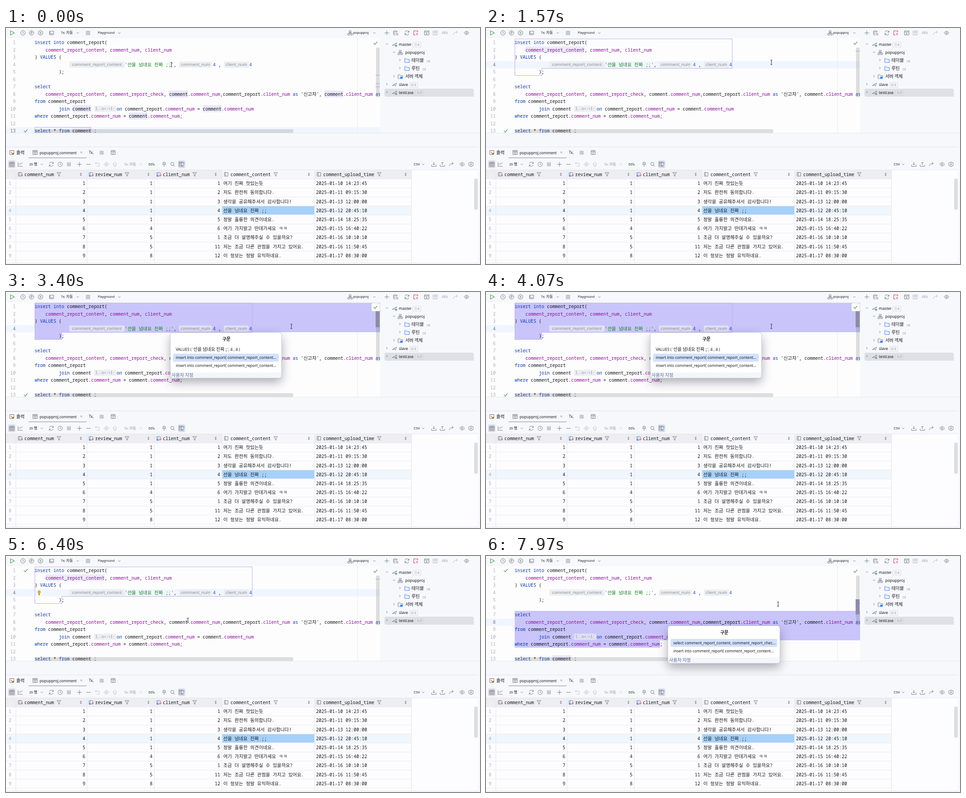
Recreate the animation shown at these times as an HTML page with a canvas. Size 1058x529 px, loop 8000 ms.

```html
<!DOCTYPE html>
<html lang="ko">
<head>
<meta charset="utf-8">
<title>SQL editor</title>
<style>
html, body { margin: 0; width: 1058px; height: 529px; overflow: hidden; background: #f7f8fb; }
canvas { display: block; width: 1058px; height: 529px; }
</style>
</head>
<body>
<canvas></canvas>
<script>
const canvas = document.querySelector('canvas'), g = canvas.getContext('2d');
const ratio = window.devicePixelRatio || 1;
canvas.width = 1058 * ratio;
canvas.height = 529 * ratio;

const LOOP = 8000;
const INK = '#6c707e', PALE = '#b9bcc8', DARK = '#17181c', GREEN = '#4fa85a', BLUE = '#4682fa';
const PANEL = '#f7f8fb', RULE = '#e6e7ee', VIOLET = '#b9aeee';

const ring = r => `M${-r} 0a${r} ${r} 0 1 0 ${2 * r} 0a${r} ${r} 0 1 0 ${-2 * r} 0`;
const shapes = {
  play: 'M-4-4.7 4.7 0-4 4.7Z',
  clock: ring(5) + 'M0-3V0L2.5 1.5',
  circleP: ring(5) + 'M-1.3 3V-2.5H.4a1.6 1.6 0 0 1 0 3.2H-1.3',
  gear: 'M-1.5-5h3l.6 1.6 1.8-.3 1.4 2.4-1.2 1.3 1.2 1.3-1.4 2.4-1.8-.3-.6 1.6h-3l-.6-1.6-1.8.3-1.4-2.4 1.2-1.3-1.2-1.3 1.4-2.4 1.8.3Z' + ring(1.5),
  screen: 'M-3.5-4h8v6h-8ZM-5-4v8h9.5',
  down: 'M-2.5-1.2 0 1.3 2.5-1.2',
  right: 'M-1.2-2.5 1.3 0-1.2 2.5',
  schema: 'M-2-5h4v3.6h-4ZM-5 1.2h3.8v3.6h-3.8ZM1.2 1.2h3.8v3.6h-3.8ZM0-1.4V0M-3 1.2V0h6v1.2',
  plus: 'M0-5V5M-5 0H5',
  minus: 'M-5 0H5',
  db: 'M-5-3.5a4 1.5 0 1 0 8 0a4 1.5 0 1 0-8 0V3.5a4 1.5 0 0 0 4 1.5M-5 0a4 1.5 0 0 0 4 1.5M3-3.5V-1M1 3a2 2 0 1 0 4 0a2 2 0 1 0-4 0',
  refresh: 'M4.5-1.5a4.7 4.7 0 0 0-9 0M-4.5 1.5a4.7 4.7 0 0 0 9 0M4.5-5v3.5h-3M-4.5 5v-3.5h3',
  table: 'M-5-4.5h10v9h-10ZM-5-1.5h10M-1.7-4.5v9M1.7-4.5v9',
  chart: 'M-5-4.5v9h10M-3 1l2.5-3 2 2 3.5-4',
  undo: 'M-2-5l-2.5 2.5 2.5 2.5M-4.5-2.5h6a3 3 0 0 1 0 6.5h-3',
  eye: 'M-5.5 0q5.5-8 11 0q-5.5 8-11 0' + ring(1.7),
  up: 'M0-5l4.5 4.5h-2.5v5h-4v-5h-2.5Z',
  pin: 'M-3-4.5h6M-2-4.5v4.5h4v-4.5M-4 0h8M0 0v5',
  search: 'M-4.5-1a3.5 3.5 0 1 0 7 0a3.5 3.5 0 1 0-7 0M1.5 1.5 5 5',
  filter: 'M-4.2-4h8.4l-3 4v4.2l-2.2-1.4v-2.8Z',
  save: 'M0-5v6.5M-2.5-1 0 1.5 2.5-1M-5 1v3.7h10v-3.7',
  load: 'M0 2v-7M-2.5-2.5 0-5 2.5-2.5M-5 1v3.7h10v-3.7',
  jump: 'M-5 4q1-6 9.5-6M1.5-5 4.5-2 1.5 1',
  runBox: 'M-5-4.5h10v9h-10ZM-5-2h10M-1 0v3l2.5-1.5Z',
  link: 'M5-1v-3.5h-9v9h4M2 1.5 5 4.5M5 1.5 2 4.5',
  layout: 'M-4.5-4.5h9v9h-9ZM-4.5-1.5h9M0-4.5v9',
  page: 'M-4.5-4.5h9v9h-9ZM-2-2 0 0-2 2',
  column: 'M-4.5-4h8v8h-8ZM-2-4v8',
  folder: 'M-5-4h4l1.2 1.5h5v6.7h-10.2Z',
  feather: 'M-5 2.5 5-4 2 3.5 0 .5Z',
  check: 'M-4 0l3 3 5-6',
  cross: 'M-2.3-2.3 2.3 2.3M2.3-2.3-2.3 2.3',
  sort: 'M-1.8-1 0-3.2 1.8-1ZM-1.8 1 0 3.2 1.8 1Z',
  beam: 'M-2-5h1.2q.8 0 .8.8v8.4q0 .8-.8.8H-2M2-5H.8q-.8 0-.8.8M2 5H.8q-.8 0-.8-.8'
};
for (const k in shapes) shapes[k] = new Path2D(shapes[k]);

function icon(name, x, y, color = INK, width = .9, fill) {
  g.save();
  g.translate(x, y);
  g.strokeStyle = color;
  g.lineWidth = width;
  if (fill) { g.fillStyle = fill; g.fill(shapes[name]); }
  g.stroke(shapes[name]);
  g.restore();
}

function rect(x, y, w, h, color, radius = 0) {
  g.fillStyle = color;
  g.beginPath();
  g.roundRect(x, y, w, h, radius);
  g.fill();
}

function outline(points, color) {
  g.strokeStyle = color;
  g.lineWidth = 1;
  g.beginPath();
  points.forEach(([x, y]) => g.lineTo(x + .5, y + .5));
  g.closePath();
  g.stroke();
}

// Draws Latin and Hangul runs with their own fonts; returns the end position.
function text(s, x, y, color = DARK, size = 8.55, { mono, align = 0, weight = 400 } = {}) {
  const runs = String(s).match(/[ㄱ-ㅎ가-힣]+|[^ㄱ-ㅎ가-힣]+/g).map(str => {
    const hangul = /[ㄱ-ㅎ가-힣]/.test(str);
    const px = hangul ? size * (mono ? 1.045 : 1.18) : size;
    const family = hangul ? '"Noto Sans CJK KR", sans-serif'
      : mono ? '"Noto Sans Mono", monospace' : '"Noto Sans", sans-serif';
    const font = `${weight} ${px}px ${family}`;
    g.font = font;
    return { str, font, w: g.measureText(str).width };
  });
  x -= align * runs.reduce((sum, r) => sum + r.w, 0);
  g.fillStyle = color;
  for (const r of runs) {
    g.font = r.font;
    g.fillText(r.str, x, y + size * .35);
    x += r.w;
  }
  return x;
}
const mono = (s, x, y, color, align = 0) => text(s, x, y, color, 10, { mono: true, align, weight: 500 });

const lineY = n => 16 + 16.5 * n;

function code(s, x, n) {
  for (const token of s.match(/'[^']*;;'|\w+|[^\w']+|'/g)) {
    const color = /;;'/.test(token) ? '#067d17'
      : /^(insert|into|VALUES|select|from|join|on|where|as)$/.test(token) ? '#0a36a8'
      : /_(num|content|check)$/.test(token) ? '#871094'
      : /^\d+$/.test(token) ? '#1750eb' : DARK;
    x = mono(token, x, lineY(n), color);
  }
}

function hint(s, x, w, n, size = 9.3, isMono) {
  rect(x, lineY(n) - 7, w, 14, 'rgba(233,234,238,.72)', 3);
  text(s, x + w / 2, lineY(n), '#878b98', size, { mono: isMono, align: .5 });
}

function topBar() {
  icon('play', 14, 11, GREEN, 1.2);
  [['clock', 38], ['circleP', 57], ['gear', 77], ['screen', 102]].forEach(([n, x]) => icon(n, x, 11));
  text('Tx: 자동', 123, 11, DARK, 7);
  icon('down', 160, 11);
  rect(178, 6, 10, 10, '#c9cbd3', 1);
  text('Playground', 205, 11, DARK, 6.9);
  icon('down', 253, 11);
  icon('schema', 768, 11);
  text('popupproj', 775, 11, DARK, 7);
  icon('down', 822, 11);
  [['plus', 850], ['db', 870], ['refresh', 895], ['runBox', 939], ['eye', 1028]].forEach(([n, x]) => icon(n, x, 11));
  icon('link', 914, 11, '#db3b4b', 1.1);
  icon('table', 958, 11, PALE);
  text('DDL', 973, 11, '#8d91a0', 7);
  icon('jump', 1003, 11, PALE);
}

function tree() {
  rect(845, 136, 199, 18, '#dfe0e5', 3);
  const source = (y, name, count, bx, live, open) => {
    icon(open ? 'down' : 'right', 850, y - 1);
    icon('feather', 867, y);
    if (live) rect(869, y + 1, 4, 4, '#55b062', 2);
    text(name, 877, y);
    g.strokeStyle = '#d3d5db';
    g.lineWidth = .8;
    g.strokeRect(bx - 3, y - 5, 18, 11);
    text(count, bx, y, '#8d91a0', 7.6);
  };
  source(37, 'master', '1/4', 911, true, true);
  icon('down', 866, 54);
  icon('schema', 880, 55);
  text('popupproj', 891, 55, DARK, 8.8);
  [[73, '테이블', 18, 938], [91, '루틴', 10, 929]].forEach(([y, name, n, x]) => {
    icon('right', 879, y - 1);
    icon('folder', 895, y, BLUE, 1, '#edf3ff');
    text(name, 905, y);
    text(n, x, y + 1, '#8d91a0', 7.4);
  });
  icon('right', 866, 108);
  icon('folder', 880, 109);
  rect(880, 109, 5, 5, BLUE, 1);
  text('서버 객체', 891, 109);
  source(127, 'slave', '0/3', 904);
  source(145, 'testcase', '1/7', 917, true);
}

function results() {
  rect(0, 266, 1054, 1, RULE);
  icon('page', 13, 279, '#8a5a50');
  rect(13, 280, 4, 4, '#e0653f', 1);
  text('출력', 23, 280);
  icon('table', 65, 279);
  text('popupproj.comment', 75, 280);
  icon('cross', 168, 279, '#9a9eab');
  rect(50, 290, 130, 2, '#b9bbd0', 1);
  text('Tx,', 185, 279, DARK, 8);
  rect(209, 275, 9, 9, '#c9cbd3', 1);
  icon('layout', 239, 279);

  [13, 392].forEach(x => rect(x - 8, 297, 16, 17, '#dadce3', 3));
  [['table', 13], ['chart', 32], ['refresh', 101], ['clock', 121], ['plus', 164], ['minus', 184],
    ['pin', 353], ['search', 372], ['save', 955], ['load', 974], ['jump', 994], ['eye', 1018], ['gear', 1038]
  ].forEach(([n, x]) => icon(n, x, 305.5));
  [['undo', 204], ['eye', 224], ['up', 243], ['down', 301]].forEach(([n, x]) => icon(n, x, 305.5, PALE));
  icon('layout', 391, 305);
  icon('filter', 394, 307, BLUE, .9, '#fff');
  text('20 행', 52, 305.5, DARK, 7.2);
  icon('down', 80, 305.5);
  rect(136, 301, 9, 9, '#c9cbd3', 1);
  text('Tx: 자동', 264, 305.5, '#8d91a0', 7);
  text('DDL', 318, 305.5, DARK, 7.5);
  text('CSV', 910, 305.5, DARK, 7.8);
  icon('down', 931, 305.5);

  rect(0, 318, 1054, 209, '#fdfdff');
  rect(0, 318, 905, 20, '#eeeef2');
  rect(482, 318, 207, 20, '#f6f6fb');
  rect(0, 399, 905, 20, '#f0f6fe');
  rect(483, 399, 205, 19, '#a6d0fa');
  rect(0, 317.5, 1054, 1, RULE);
  for (let i = 0; i < 10; i++) rect(0, 338 + 20.2 * i, 905, 1, '#ebebf1');
  [22, 181, 331, 482, 689, 905].forEach(x => rect(x - .5, 318, 1, 209, '#e3e3ea'));
  [['comment_num', 41, 118, 167, 1], ['review_num', 199, 270, 318, 2], ['client_num', 350, 421, 468, 2],
    ['comment_content', 501, 602, 676, 0], ['comment_upload_time', 708, 833, 892, 0]
  ].forEach(([name, x, fx, sx, keys]) => {
    icon('column', x - 9, 328, keys === 2 ? '#5f83d8' : INK);
    if (keys) rect(x - 8, 328, 5, 4, '#e8924a', 2);
    if (keys === 2) rect(x - 14, 330, 4, 3, BLUE, 1);
    mono(name, x, 328);
    icon('filter', fx, 328);
    icon('sort', sx, 328, INK, .3, INK);
  });
  [[1, 1, '여기 진짜 맛있는듯', '10 14:23:45'], [1, 2, '저도 완전히 동의합니다.', '11 09:15:30'],
    [1, 3, '생각을 공유해주셔서 감사합니다!', '13 12:00:00'], [1, 4, '선을 넘네요 진짜 ;;', '12 20:45:10'],
    [1, 5, '정말 훌륭한 의견이네요.', '14 18:25:35'], [4, 6, '여기 가지말고 딴데가세요 ㅋㅋ', '15 16:40:22'],
    [5, 1, '조금 더 설명해주실 수 있을까요?', '16 10:10:10'], [5, 11, '저는 조금 다른 관점을 가지고 있어요.', '16 11:50:45'],
    [8, 12, '이 정보는 정말 유익하네요.', '17 08:30:00']
  ].forEach(([review, client, content, time], i) => {
    const y = 348.7 + 20.2 * i;
    mono(i + 1, 6, y, '#a8adbd');
    mono(i + 1, 177, y, DARK, 1);
    mono(review, 327, y, DARK, 1);
    mono(client, 478, y, DARK, 1);
    mono(content, 485, y);
    mono('2025-01-' + time, 692, y);
  });
  rect(1045, 338, 8, 69, '#dcdde2');
  rect(0, 526, 1054, 1, RULE);
}

const insertBox = [[64, 24], [549, 24], [549, 90], [124, 90], [124, 106], [64, 106]];
const selectBox = [[64, 123], [840, 123], [840, 189], [388, 189], [388, 205], [64, 205]];
const lastBox = [[64, 222], [189, 222], [189, 240], [64, 240]];
const commentUses = [[364, 8], [711, 8], [148, 10], [439, 10], [274, 11], [148, 13]];

function editor(t) {
  const line = t < 650 ? 13 : t < 6800 ? 4 : 8;
  const onComment = line !== 4;
  const pickInsert = t >= 3100 && t < 4600, pickSelect = t >= 7600;
  const popupOpen = pickInsert || pickSelect;

  g.save();
  g.beginPath();
  g.rect(0, 23, 835, 212);
  g.clip();
  rect(0, 23, 835, 212, '#fdfdfe');
  rect(0, lineY(line) - 8, 835, 16.5, '#f1f6fe');
  rect(784, 23, 1, 212, '#ebecf1');
  if (onComment) commentUses.forEach(([x, n]) => rect(x, lineY(n) - 8, 42, 15.5, '#e9e7f9'));
  else rect(88, lineY(2) - 8, 132, 15.5, '#ecebf9');

  const selected = '#c9c5fb';
  if (pickInsert) {
    rect(64, 24, 771, 66, selected);
    rect(64, 90, 60, 16, selected);
  }
  if (pickSelect) {
    rect(64, 123, 771, 66, selected);
    rect(64, 189, 324, 16.5, selected);
  }
  if (!pickSelect) outline(t < 1000 ? lastBox : t < 7250 ? insertBox : selectBox, VIOLET);

  for (let n = 1; n <= 13; n++) mono(n, 21.5, lineY(n), n === line ? '#6c707e' : '#a8adbd', 1);
  code('insert into comment_report(', 64, 1);
  code('comment_report_content, comment_num, client_num', 88, 2);
  code(') VALUES (', 64, 3);
  hint('comment_report_content', 141, 124, 4);
  code("'선을 넘네요 진짜 ;;',", 265, 4);
  hint('comment_num', 386, 74, 4);
  code('4 ,', 462, 4);
  hint('client_num', 486, 56, 4);
  code('4', 543, 4);
  code(');', 118, 5);
  code('select', 64, 7);
  code("comment_report_content, comment_report_check, comment.comment_num,comment_report.client_num as '신고자', comment.client_num as", 88, 8);
  code('from comment_report', 64, 9);
  code('join comment', 118, 10);
  hint('1..n<->1:', 196, 50, 10, 8, true);
  code('on comment_report.comment_num = comment.comment_num', 247, 10);
  code('where comment_report.comment_num = comment.comment_num;', 64, 11);
  code('select * from comment ;', 64, 13);

  icon('check', 44, t < 4700 ? lineY(13) : lineY(1), GREEN, 1.5);
  if (t >= 1600 && t < 6800 && !popupOpen) {
    rect(70.5, 77, 7, 7, '#f5a623', 3.5);
    rect(72.5, 84, 3, 3.5, '#8d7a55', 1);
  }
  const sinceClick = t - (line === 8 ? 6800 : 650);
  if (line !== 13 && !popupOpen && sinceClick % 1000 < 500)
    rect(line === 4 ? 367 : 405.5, lineY(line) - 8, 1.3, 16, '#000');

  rect(64, 227, 577, 8, 'rgba(90,90,95,.2)');
  rect(826, 44, 8, 111, 'rgba(90,90,95,.2)');
  if (onComment) [105, 124, 131].forEach(y => rect(825, y, 10, 1.6, '#bcb2ee'));
  else rect(825, 51, 10, 1.5, '#b5b6be');
  if (pickInsert) rect(825, 43, 9, 36, '#8f8ba9');
  if (pickSelect) rect(825, 97, 9, 34, '#8f8ba9');
  if (pickInsert) rect(816, 25, 18, 18, '#fff', 3);
  icon('check', 824.5, 34, GREEN, 1.5);
  g.restore();
  rect(0, 235, 1054, 1, RULE);
}

function popup(x, y, w, items, active) {
  const h = 48 + 18 * items.length;
  g.save();
  g.shadowColor = 'rgba(40,40,60,.38)';
  g.shadowBlur = 22 * ratio;
  g.shadowOffsetY = 9 * ratio;
  rect(x, y, w, h, '#fff', 6);
  g.restore();
  rect(x, y + h - 13, w, 13, '#f5f6fa', [0, 0, 6, 6]);
  g.strokeStyle = '#c6c8d0';
  g.lineWidth = .8;
  g.beginPath();
  g.roundRect(x, y, w, h, 6);
  g.stroke();
  text('구문', x + w / 2 + 1, y + 15.5, DARK, 8.3, { align: .5, weight: 700 });
  items.forEach((s, i) => {
    const cy = y + 38.3 + 18 * i;
    if (i === active) rect(x + 6, cy - 9, w - 12, 18, '#d3e1fd', 3);
    text(s, x + 12, cy);
  });
  text('사용자 지정', x + 2.5, y + h - 6, '#56689a');
}

const mouse = [[0, 369, 82], [900, 370, 82], [1500, 637, 77], [5200, 637, 77], [6100, 406, 144],
  [6650, 406, 144], [6850, 411, 142], [7100, 411, 142], [7500, 652, 108], [LOOP, 652, 108]];

function pointer(t) {
  const i = mouse.findIndex(k => k[0] > t);
  const [t0, x0, y0] = mouse[i - 1], [t1, x1, y1] = mouse[i];
  const p = (t - t0) / (t1 - t0), e = p * p * (3 - 2 * p);
  icon('beam', x0 + (x1 - x0) * e, y0 + (y1 - y0) * e, '#222', 1);
}

function draw(now) {
  const t = now % LOOP;
  g.setTransform(ratio, 0, 0, ratio, 0, 0);
  rect(0, 0, 1058, 529, PANEL);
  topBar();
  tree();
  editor(t);
  results();
  const insert = 'insert into comment_report( comment_report_content...';
  if (t >= 3100 && t < 4600)
    popup(367, 91, 248, ["VALUES ( '선을 넘네요 진짜 ;;', 4 , 4 )", insert, insert], 1);
  if (t >= 7600)
    popup(406, 156.5, 250, ['select comment_report_content, comment_report_chec...', insert], 0);
  pointer(t);
}

const start = performance.now();
(function tick() {
  draw(performance.now() - start);
  requestAnimationFrame(tick);
})();
</script>
</body>
</html>
```
